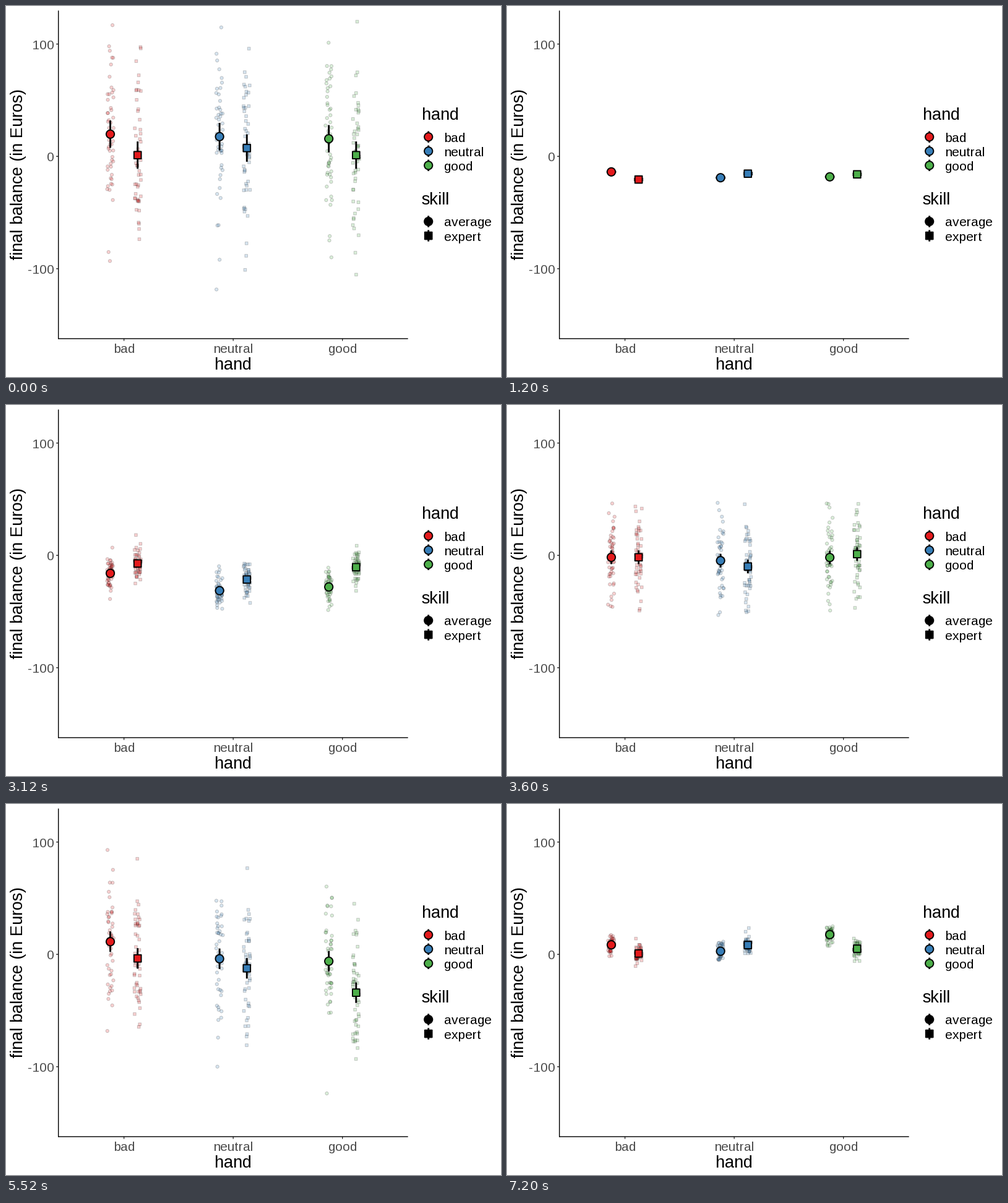
These frames come from a looping animation (800 by 600 pixels, 8000 ms). A matplotlib script:

```python
import numpy as np
import matplotlib.pyplot as plt
from matplotlib.animation import FuncAnimation

plt.rcParams["text.hinting_factor"] = 1  # whole-pixel letter spacing

W, H, DPI = 800, 600, 100
PT = 72 / DPI  # points per pixel
LEFT, RIGHT, TOP, BOTTOM = 84.7, 649.7, 7.4, 538
ZERO, UNIT = 243.2, 1.8165
STEP = (RIGHT - LEFT) / 3.2
DODGE, JITTER = STEP / 8, 5.3
THIN, THICK = 1.42, 2.85
KEY = 23.04
N = 50

HANDS = ["bad", "neutral", "good"]
COLORS = ["#E41A1C", "#377EB8", "#4DAF4A"]
CENTERS = [LEFT + (0.6 + i) * STEP for i in range(3)]
SHAPES = ["o", "s"]

# Each state: spread of the balances, then the mean of every group
STATES = [
    (44, [19.8, 1.1, 17.6, 7.4, 15.7, 1.1]),
    (0, [-13.8, -20.6, -19, -15.4, -18.2, -16]),
    (8.5, [-16, -7.2, -31.4, -21.5, -28.1, -10.5]),
    (22, [-1.7, -1.7, -4.7, -9.9, -1.9, 1.1]),
    (33, [11.3, -3.6, -3.9, -12.4, -6.1, -34.1]),
    (2.3, [-2.8, 13.5, 6.1, 23.7, 3, 13.8]),
    (4.5, [8.5, 0.8, 2.8, 8.3, 17.6, 5]),
]

fig = plt.figure(figsize=(W / DPI, H / DPI), dpi=DPI, facecolor="white")
ax = fig.add_axes([0, 0, 1, 1])
ax.set_xlim(0, W)
ax.set_ylim(H, 0)
ax.axis("off")


def to_y(value):
    return ZERO - UNIT * value


def line(xs, ys, width=THIN, color="black", z=1):
    return ax.plot(xs, ys, color=color, lw=width * PT, zorder=z,
                   solid_capstyle="butt", snap=False)[0]


def text(x, y, s, size=21.33, color="black", ha="left", **kw):
    ax.text(x, y, s, fontsize=size * PT, color=color, ha=ha,
            va="baseline", family="Liberation Sans", **kw)


def markers(shape, color, size, stroke, z, alpha=1):
    side = size if shape == "o" else size * np.sqrt(np.pi) / 2
    dots = ax.scatter([], [], s=(side * PT) ** 2, marker=shape,
                      facecolor=color, edgecolor="black", alpha=alpha,
                      linewidth=stroke * PT, zorder=z)
    dots.set_snap(False)
    dots.set_antialiased([True, True])  # two values keep subpixel positions
    return dots


def mean_marker(x, y, shape, color):
    dot = markers(shape, color, 13.27, 1.89, 5)
    dot.set_offsets([[x, y]])
    return dot


def draw_axes():
    line([LEFT, LEFT], [TOP, BOTTOM + THIN / 2])
    line([LEFT, RIGHT], [BOTTOM, BOTTOM])
    for value in (100, 0, -100):
        y = to_y(value)
        line([LEFT - 3.67, LEFT], [y, y], color="#333333", z=0)
        text(77.6, y + 8, str(value), color="#4D4D4D", ha="right")
    for x, name in zip(CENTERS, HANDS):
        line([x, x], [BOTTOM, BOTTOM + 3.67], color="#333333", z=0)
        text(x, 561, name, color="#4D4D4D", ha="center")
    text((LEFT + RIGHT) / 2, 588, "hand", 26.67, ha="center")
    text(27, (TOP + BOTTOM) / 2, "final balance (in Euros)", 26.67,
         ha="center", rotation=90, rotation_mode="anchor")


def draw_legend(title, y, entries):
    text(672, y, title, 26.67)
    for i, (label, shape, color) in enumerate(entries):
        mid = y + 27.3 + KEY * i
        line([682.7, 682.7], [mid - 0.4 * KEY, mid + 0.4 * KEY], THICK, z=4)
        mean_marker(682.7, mid, shape, color)
        text(708, mid + 8, label)


draw_axes()
draw_legend("hand", 184.4, [(h, "o", c) for h, c in zip(HANDS, COLORS)])
draw_legend("skill", 321.2, [("average", "o", "black"),
                             ("expert", "s", "black")])

groups = []
for center, color in zip(CENTERS, COLORS):
    for shape, x in zip(SHAPES, (center - DODGE, center + DODGE)):
        groups.append((x, markers(shape, color, 5.2, 0.95, 2, alpha=0.2),
                       line([x, x], [0, 0], THICK, z=4),
                       mean_marker(x, 0, shape, color)))


def update(i):
    state = i // 3
    rng = np.random.default_rng(40 + state)
    sd, means = STATES[state]
    error = 1.96 * sd / np.sqrt(N)
    for (x, cloud, bar, point), mean in zip(groups, means):
        z = rng.normal(size=N)
        balance = mean + sd * (z - z.mean()) / z.std()
        xs = x + rng.uniform(-JITTER, JITTER, N)
        cloud.set_offsets(np.column_stack([xs, to_y(balance)]))
        bar.set_ydata([to_y(mean - error), to_y(mean + error)])
        point.set_offsets([[x, to_y(mean)]])


anim = FuncAnimation(fig, update, frames=20, interval=400, repeat=True,
                     repeat_delay=0, init_func=lambda: update(0))
plt.show()
```
